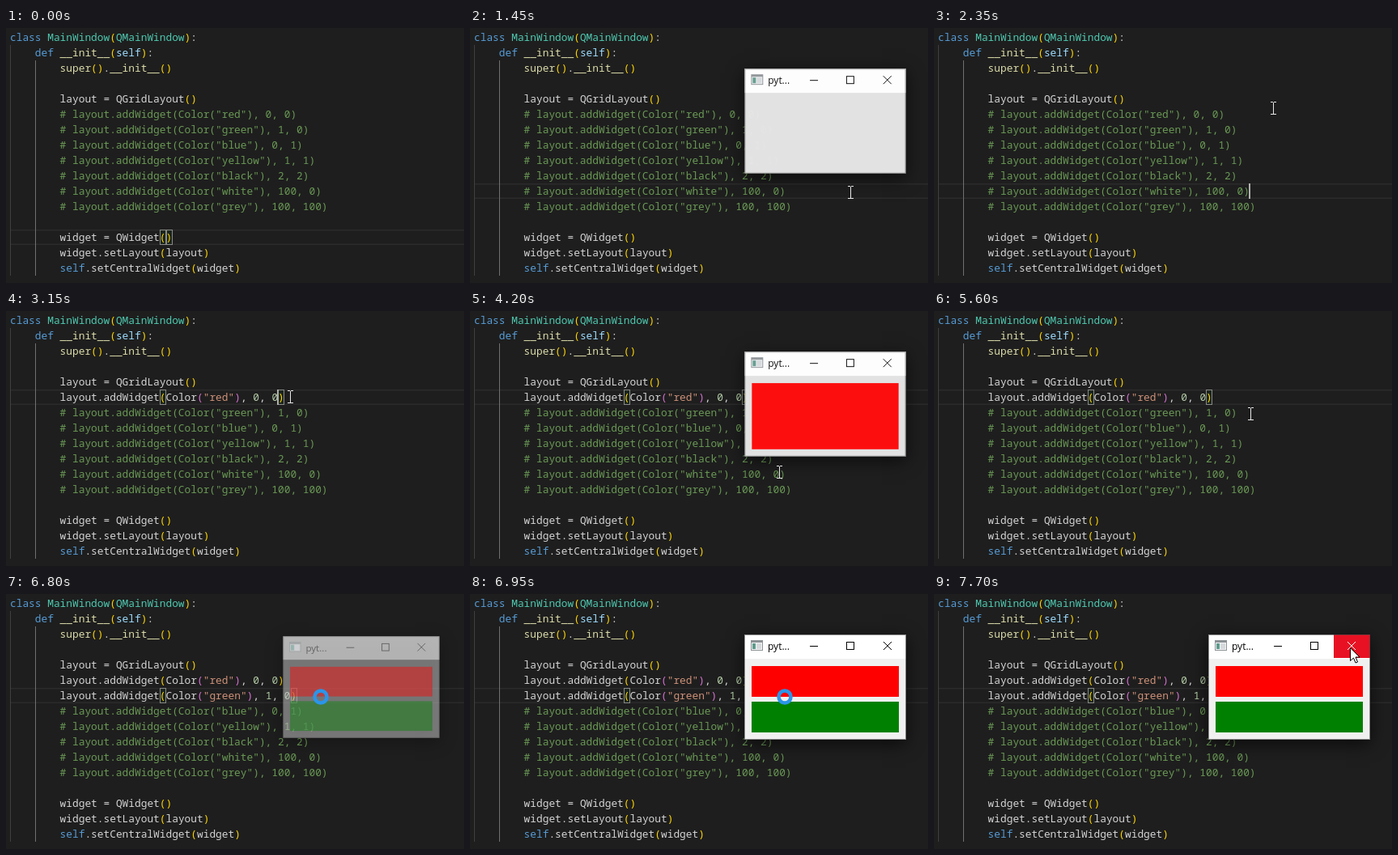
Write an HTML page with a canvas that moves like this. It is 566x315 px and loops after 8000 ms.

```html
<!DOCTYPE html>
<html lang="en">
<head>
<meta charset="utf-8">
<title>Grid layout demo</title>
<style>
  html, body { margin: 0; width: 100%; height: 100%; overflow: hidden; background: #1e1e1e; }
  canvas { display: block; }
</style>
</head>
<body>
<canvas id="stage" width="566" height="315"></canvas>
<script>
const ctx = document.getElementById('stage').getContext('2d');
const LOOP = 8000, STEP = 50;
const LEFT = 5, TOP = 2, CHAR = 7.7, LINE = 19;
const CODE_FONT = '12.833px "Noto Sans Mono", monospace';

const call = (color, cell) => `        # layout.addWidget(Color("${color}"), ${cell})`;
const source = [
  'class MainWindow(QMainWindow):',
  '    def __init__(self):',
  '        super().__init__()',
  '',
  '        layout = QGridLayout()',
  call('red', '0, 0'),
  call('green', '1, 0'),
  call('blue', '0, 1'),
  call('yellow', '1, 1'),
  call('black', '2, 2'),
  call('white', '100, 0'),
  call('grey', '100, 100'),
  '',
  '        widget = QWidget()',
  '        widget.setLayout(layout)',
  '        self.setCentralWidget(widget)'
];

const BRACKETS = ['#ffd700', '#da70d6', '#179fff'];
const WORDS = {
  class: '#569cd6', def: '#569cd6', self: '#569cd6',
  MainWindow: '#4ec9b0', QMainWindow: '#4ec9b0',
  __init__: '#dcdcaa', super: '#dcdcaa'
};

// [open, close, number of coloured rows]
const windows = [[1350, 2150, 0], [4100, 5150, 1], [6800, Infinity, 2]];
const caretOn = [[400, 700], [1050, 1350], [2350, 2950], [3150, 3450],
                 [3750, 4100], [5650, 5950], [6200, 6500]];
// [time, x, y]
const pointerPath = [
  [150, 496, 300], [450, 470, 203], [1750, 470, 203], [2100, 512, 68], [2150, 512, 68],
  [2450, 386, 110], [2550, 386, 110], [2800, 351, 106], [3200, 351, 106], [3250, 378, 203],
  [4150, 378, 203], [4650, 504, 68], [5200, 504, 68], [5550, 391, 127],
  [7150, 391, 127], [7700, 514, 66]
];

const colX = col => LEFT + col * CHAR;
const lineY = line => TOP + line * LINE;

function rect(color, x, y, w, h) {
  ctx.fillStyle = color;
  ctx.fillRect(x, y, w, h);
}

function path(points, color, width = 1) {
  ctx.beginPath();
  points.forEach(([x, y]) => ctx.lineTo(x, y));
  ctx.strokeStyle = color;
  ctx.lineWidth = width;
  ctx.stroke();
}

function drawLine(text, line) {
  let depth = 0;
  for (const { 0: token, index } of text.matchAll(/#.*|"\w*"|\w+|[^\s\w]/g)) {
    let color = WORDS[token] || '#d4d4d4';
    if (token[0] === '#') color = '#6a9955';
    else if (token[0] === '"') color = '#ce9178';
    else if (/^\d/.test(token)) color = '#b5cea8';
    else if (token === '(') color = BRACKETS[depth++];
    else if (token === ')') color = BRACKETS[--depth];
    if (line === 1 && token === 'self') color = '#9cdcfe';
    ctx.fillStyle = color;
    ctx.fillText(token, colX(index), lineY(line) + 14);
  }
}

function drawBracketBox(line, col) {
  const x = Math.round(colX(col)), y = lineY(line);
  rect('rgba(0,100,0,.1)', x, y, 8, LINE);
  ctx.strokeStyle = '#888';
  ctx.lineWidth = 1;
  ctx.strokeRect(x + .5, y + .5, 7, LINE - 1);
}

function drawEditor(t) {
  const current = t < 400 ? 13 : t < 2800 ? 10 : t < 5650 ? 5 : 6;
  const shown = { 5: t >= 3150, 6: t >= 6200 };

  rect('#1e1e1e', 0, 0, 566, 315);
  rect('#2b2b2b', LEFT, lineY(current), 561, 1.5);
  rect('#2b2b2b', LEFT, lineY(current + 1) - 1.5, 561, 1.5);
  rect('#404040', 5, lineY(1), 1, 15 * LINE);
  rect('#707070', 36, lineY(2), 1, 14 * LINE);

  const pair = current === 13 ? [24, 25]
    : current === 5 && shown[5] ? [24, 43]
    : current === 6 && t >= 6300 ? [24, 45] : [];
  pair.forEach(col => drawBracketBox(current, col));

  ctx.font = CODE_FONT;
  source.forEach((text, i) => drawLine(shown[i] ? text.replace('# ', '') : text, i));

  if (caretOn.some(([from, to]) => t >= from && t < to)) {
    const col = { 10: 50, 5: 45, 6: 48 }[current] - (shown[current] ? 2 : 0);
    rect('#aeafad', Math.round(colX(col)) - 1, lineY(current), 2, LINE);
  }
}

function windowAlpha(t, [open, close]) {
  if (t < open) return 0;
  const phase = from => Math.min(1, (t - from + STEP) / 200);
  return t < close ? 1 - (1 - phase(open)) ** 2 : 1 - phase(close);
}

function drawWindow(alpha, rows, hover) {
  ctx.save();
  ctx.globalAlpha = alpha;
  const scale = .94 + .06 * alpha;
  ctx.translate(439, 115);
  ctx.scale(scale, scale);
  ctx.translate(-439, -115);

  ctx.save();
  ctx.shadowColor = 'rgba(0,0,0,.65)';
  ctx.shadowBlur = 20;
  ctx.shadowOffsetY = 5;
  rect('#f0f0f0', 339, 50, 200, 130);
  ctx.restore();
  rect('#fff', 339, 50, 200, 30);

  // title bar icon
  rect('#8c9296', 347, 57, 15, 13);
  rect('#f4f4f4', 348, 60, 13, 9);
  rect('#5f9a8c', 349, 61, 4, 7);
  rect('#d5d9dc', 354, 61, 6, 7);

  ctx.font = '12px "Open Sans", sans-serif';
  ctx.fillStyle = '#000';
  ctx.fillText('pyt...', 368, 69);
  rect('#000', 420, 64, 10, 1);
  ctx.strokeStyle = '#000';
  ctx.lineWidth = 1;
  ctx.strokeRect(465.5, 59.5, 9, 9);
  if (hover) rect('#e81123', 494, 50, 45, 29);
  const cross = hover ? '#fff' : '#000';
  path([[511, 59], [521, 69]], cross);
  path([[521, 59], [511, 69]], cross);

  if (rows === 1) rect('#f00', 348, 89, 182, 82);
  if (rows === 2) {
    rect('#f00', 348, 89, 182, 38);
    rect('#008000', 348, 133, 182, 38);
  }
  ctx.strokeStyle = 'rgba(70,70,70,.6)';
  ctx.strokeRect(339.5, 50.5, 199, 129);
  ctx.restore();
}

function pointerAt(t) {
  const next = pointerPath.findIndex(p => p[0] > t);
  if (next === 0) return null;
  if (next < 0) return pointerPath.at(-1).slice(1);
  const [t0, x0, y0] = pointerPath[next - 1], [t1, x1, y1] = pointerPath[next];
  const p = (t - t0) / (t1 - t0), k = p * p * (3 - 2 * p);
  return [Math.round(x0 + (x1 - x0) * k), Math.round(y0 + (y1 - y0) * k)];
}

function drawArrow() {
  const points = [[0, 0], [0, 16], [4, 12.5], [6.5, 18.5], [9, 17.5], [6.5, 11.5], [11.5, 11.5]];
  ctx.beginPath();
  points.forEach(([x, y]) => ctx.lineTo(x + .5, y + .5));
  ctx.closePath();
  ctx.fillStyle = '#fff';
  ctx.fill();
  ctx.strokeStyle = '#000';
  ctx.lineWidth = 1;
  ctx.stroke();
}

function drawIBeam() {
  rect('#e8e8e8', 0, -7, 1, 15);
  for (const y of [-8, 7]) {
    rect('#e8e8e8', -3, y, 3, 1);
    rect('#e8e8e8', 1, y, 3, 1);
  }
}

function drawBusyRing() {
  ctx.beginPath();
  ctx.arc(-2, 0, 7.5, 0, 2 * Math.PI);
  ctx.strokeStyle = '#2b95e9';
  ctx.lineWidth = 4.5;
  ctx.stroke();
}

function render(t) {
  drawEditor(t);
  const pointer = pointerAt(t);
  const open = windows.find(w => windowAlpha(t, w) > 0);
  const [x, y] = pointer || [0, 0];
  const inside = open && x >= 339 && x < 539 && y >= 50 && y < 180;
  if (open) drawWindow(windowAlpha(t, open), open[2], inside && x >= 494 && y < 80);
  if (!pointer) return;

  ctx.save();
  ctx.translate(x, y);
  if (!inside) drawIBeam();
  else if (t >= 6800 && t < 7200) drawBusyRing();
  else drawArrow();
  ctx.restore();
}

function tick() {
  const t = performance.now() % LOOP;
  render(Math.floor(t / STEP) * STEP);
  requestAnimationFrame(tick);
}
tick();
</script>
</body>
</html>
```
